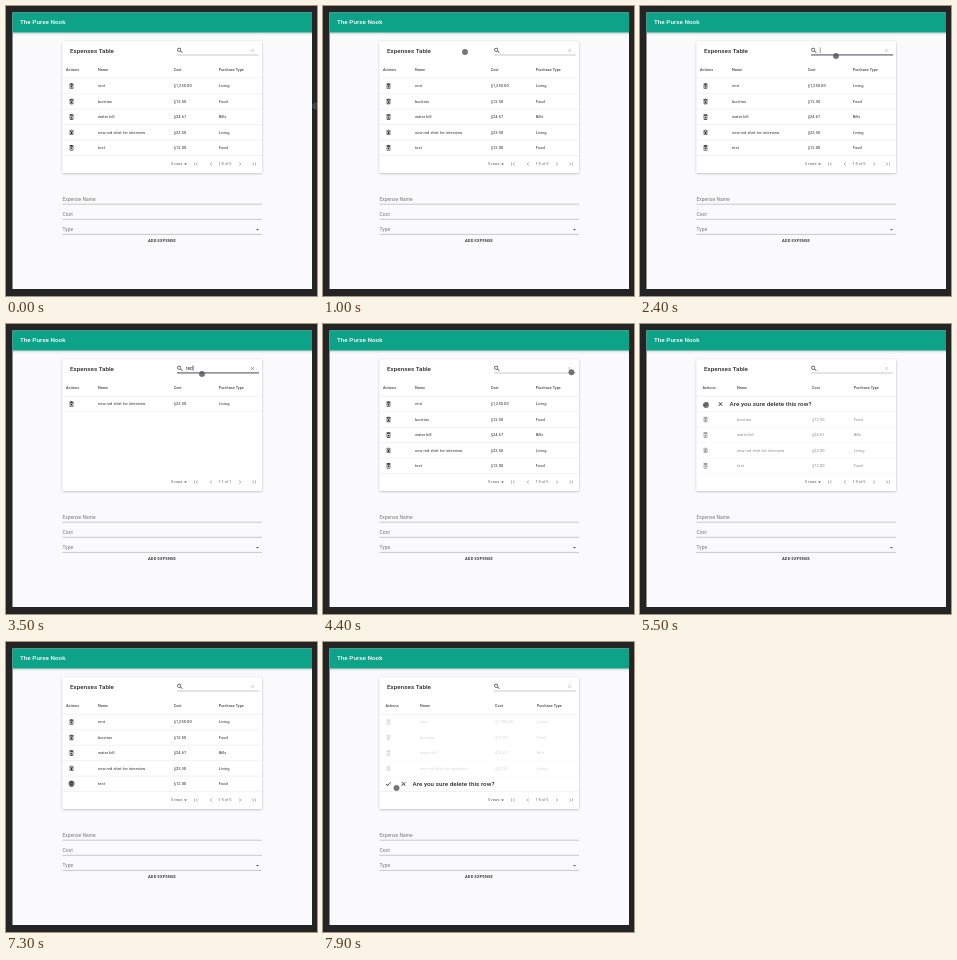
Write an HTML page that moves like this. It is 311 px wide and 290 px high and loops after 8000 ms.

```html
<!DOCTYPE html>
<html lang="en">
<head>
<meta charset="utf-8">
<title>Expenses</title>
<style>
  html, body { margin: 0; width: 100%; height: 100%; overflow: hidden; background: #242425; }
  svg { display: block; width: 311px; height: 290px; font-family: Roboto, Arial, sans-serif; }
  .title { font-size: 6.25px; font-weight: 500; letter-spacing: .0075em; }
  .cell { font-size: 4.02px; letter-spacing: .0107em; }
  .head { font-size: 3.75px; font-weight: 500; letter-spacing: .0107em; }
  .page { font-size: 3.85px; }
  .field { font-size: 4.9px; letter-spacing: .0094em; }
  .button { font-size: 4.1px; font-weight: 500; letter-spacing: .0286em; }
</style>
</head>
<body>
<svg id="stage" viewBox="0 0 311 290" xmlns="http://www.w3.org/2000/svg">
  <defs>
    <filter id="shadow" x="-10%" y="-10%" width="120%" height="130%">
      <feDropShadow dx="0" dy=".6" stdDeviation=".8" flood-opacity=".28"/>
    </filter>
    <clipPath id="page"><rect x="6.5" y="6.5" width="299.5" height="276.5"/></clipPath>
  </defs>
  <rect width="311" height="290" fill="#242425"/>
  <g clip-path="url(#page)">
    <rect x="6" y="6" width="300" height="277" fill="#faf9fc"/>
    <rect x="4" y="4" width="304" height="22.5" fill="#0fa388" filter="url(#shadow)"/>
  </g>
  <rect x="56.5" y="35.5" width="199.5" height="131.5" rx="1.2" fill="#fff" filter="url(#shadow)"/>
  <g id="scene"></g>
</svg>
<script>
const LOOP = 8000, STEP = 100, ROW_TOP = 72.3, ROW_HEIGHT = 15.45;
const scene = document.getElementById('scene');

const EXPENSES = [
  ['rent', '$1,250.00', 'Living'],
  ['burritos', '$12.50', 'Food'],
  ['water bill', '$24.67', 'Bills'],
  ['new red shirt for interview', '$23.50', 'Living'],
  ['test', '$12.00', 'Food']
];

const ICONS = {
  trash: 'M6 19c0 1.1.9 2 2 2h8c1.1 0 2-.9 2-2V7H6v12zM8 9h8v10H8V9zm7.500-5l-1-1h-5l-1 1H5v2h14V4zM10 11h4v6h-4z',
  check: 'M9 16.2L4.800 12l-1.400 1.400L9 19 21 7l-1.400-1.400z',
  close: 'M19 6.400L17.600 5 12 10.600 6.400 5 5 6.400 10.600 12 5 17.600 6.400 19 12 13.400 17.600 19 19 17.600 13.400 12z',
  search: 'M15.500 14h-.8l-.3-.3A6.500 6.500 0 1 0 13.700 14.400l.3.300v.8l5 5 1.500-1.500zM9.500 14a4.500 4.500 0 1 1 0-9 4.500 4.500 0 0 1 0 9z',
  prev: 'M15.400 7.400L14 6l-6 6 6 6 1.400-1.400L10.800 12z',
  next: 'M8.600 16.600L10 18l6-6-6-6-1.400 1.400L13.200 12z',
  first: 'M18.400 16.600L13.800 12l4.600-4.600L17 6l-6 6 6 6zM6 6h2v12H6z',
  last: 'M5.600 7.400L10.200 12l-4.600 4.600L7 18l6-6-6-6zM16 6h2v12h-2z',
  drop: 'M7 10l5 5 5-5z'
};

// time, x, y
const POINTER = [
  [100, 309.5, 100], [1000, 142, 46], [1900, 196, 50], [3700, 196, 50],
  [4300, 249, 48], [4600, 247, 49], [5300, 66, 81], [5500, 66, 81],
  [6000, 73.5, 84], [6200, 73.5, 84], [6400, 85, 84], [6600, 85, 84],
  [7200, 65.5, 141], [7400, 65.5, 142], [7900, 73.5, 146]
];

const clamp = v => Math.max(0, Math.min(1, v));
const smooth = p => p * p * (3 - 2 * p);
const easeOut = p => 1 - (1 - p) ** 2;
const between = (t, from, to) => t >= from && t < to;

const text = (x, y, str, cls, fill = '#2b2b2b', extra = '') =>
  `<text x="${x}" y="${y}" class="${cls}" fill="${fill}" ${extra}>${str}</text>`;
const icon = (name, cx, cy, fill = '#222', scale = 0.3) =>
  `<path d="${ICONS[name]}" fill="${fill}" transform="translate(${cx} ${cy}) scale(${scale}) translate(-12 -12)"/>`;
const line = (x1, x2, y, stroke, width = 0.4) =>
  `<path d="M${x1} ${y}H${x2}" stroke="${stroke}" stroke-width="${width}"/>`;

function pointerAt(t) {
  const i = POINTER.findIndex(k => k[0] > t);
  if (i === 0) return POINTER[0].slice(1);
  if (i < 0) return POINTER.at(-1).slice(1);
  const [t0, x0, y0] = POINTER[i - 1], [t1, x1, y1] = POINTER[i];
  const p = smooth((t - t0) / (t1 - t0));
  return [x0 + (x1 - x0) * p, y0 + (y1 - y0) * p];
}

function queryAt(t) {
  if (!between(t, 2600, 4300)) return '';
  return 'red'.slice(0, t < 2800 ? 1 : t < 3000 ? 2 : 3);
}

function rowOpacity(t) {
  const fade = start => easeOut(clamp((t - start) / 300));
  return 1 - 0.8 * (fade(5400) - fade(6500) + fade(7400));
}

function searchBox(t, query) {
  const focus = t < 4300 ? smooth(clamp((t - 1900) / 200)) : 0;
  const caretOn = between(t, 2400, 3200) || between(t, 3500, 4200);
  const caretX = 180.3 + [0, 1.7, 4.3, 7][query.length];
  return icon('search', 174, 44.5, '#333')
    + text(179.8, 46.2, query, 'field')
    + icon('close', 246.5, 44.5, query ? '#777' : '#bbb', 0.25)
    + line(171, 253, 49, '#888', 0.45)
    + (focus ? line(212 - 41 * focus, 212 + 41 * focus, 48.9, '#333a4c', 0.75) : '')
    + (caretOn ? `<path d="M${caretX} 41.2V47" stroke="#333" stroke-width=".45"/>` : '');
}

function expenseRow(expense, i, columns) {
  const y = ROW_TOP + ROW_HEIGHT * (i + 0.5);
  return icon('trash', 65.5, y)
    + expense.map((value, c) => text(columns[c], y + 1.4, value, 'cell')).join('');
}

function confirmRow(i) {
  const y = ROW_TOP + ROW_HEIGHT * (i + 0.5);
  return icon('check', 65.5, y) + icon('close', 80.5, y)
    + text(89.5, y + 2.1, 'Are you sure delete this row?', 'title');
}

function table(t) {
  const query = queryAt(t);
  const shown = EXPENSES.filter(e => e.join(' ').includes(query));
  const active = t < 7400 ? 0 : 4;
  const confirming = between(t, 5500, 6600) || t >= 7500;
  const columns = confirming ? [97, 172, 213.7] : [92, 167.7, 212.7];
  const dim = rowOpacity(t);

  let out = text(64, 47, 'Expenses Table', 'title') + searchBox(t, query);
  out += ['Actions', 'Name', 'Cost', 'Purchase Type'].map((label, i) =>
    text(i ? columns[i - 1] : confirming ? 62.5 : 60, 65, label, 'head', '#444')).join('');
  out += line(56.5, 256, ROW_TOP, '#ddd');

  for (let i = 0; i < EXPENSES.length; i++) {
    const body = confirming && i === active ? confirmRow(i)
      : shown[i] ? expenseRow(shown[i], i, columns) : '';
    const border = query && i >= shown.length ? '' : line(56.5, 256, ROW_TOP + ROW_HEIGHT * (i + 1), '#ddd');
    out += `<g opacity="${i === active ? 1 : dim}">${body}${border}</g>`;
  }

  const n = shown.length;
  return out + text(165, 159.4, '5 rows', 'page', '#555') + icon('drop', 179.5, 158, '#555')
    + icon('first', 190, 158, '#999') + icon('prev', 205, 158, '#999')
    + text(212.5, 159.4, `1-${n} of ${n}`, 'page', '#666')
    + icon('next', 234, 158, '#999') + icon('last', 248, 158, '#999');
}

function form() {
  return ['Expense Name', 'Cost', 'Type'].map((label, i) =>
    text(56.5, 195 + 15.1 * i, label, 'field', '#777') + line(56.5, 256, 198.2 + 15.1 * i, '#8c8c8c', 0.45)).join('')
    + icon('drop', 251.5, 223.5, '#555')
    + text(156, 235.6, 'ADD EXPENSE', 'button', '#222', 'text-anchor="middle"');
}

function draw(t) {
  const [x, y] = pointerAt(t);
  scene.innerHTML = text(14, 18.4, 'The Purse Nook', 'title', '#fff') + table(t) + form()
    + `<circle cx="${x}" cy="${y}" r="2.7" fill="#46464c" fill-opacity=".75" stroke="#707076" stroke-width=".6"/>`;
}

let lastStep = -1;
function tick() {
  const step = Math.floor(performance.now() % LOOP / STEP);
  if (step !== lastStep) draw(step * STEP);
  lastStep = step;
  requestAnimationFrame(tick);
}
tick();
</script>
</body>
</html>
```
